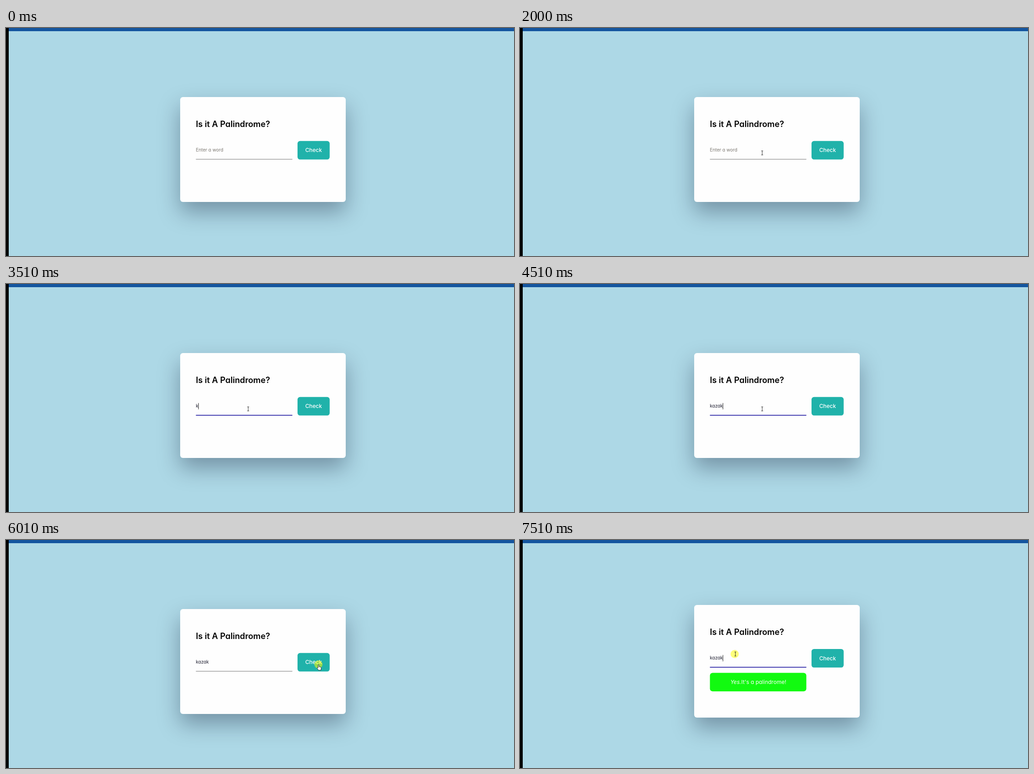
Recreate the animation shown at these times as an HTML page. Size 1117x502 px, loop 8000 ms.

```html
<!DOCTYPE html>
<html lang="en">
<head>
<meta charset="utf-8">
<title>Is it A Palindrome?</title>
<style>
html, body { margin: 0; width: 100%; height: 100%; overflow: hidden; background: #add8e6; }
#card {
  position: absolute; left: 382.6px; top: 152px; width: 364px; height: 230.5px;
  border-radius: 6px; background: #fefefe;
  box-shadow: 0 22px 48px rgba(5, 15, 40, .34);
}
#card.open { top: 143.2px; height: 248px; }
svg { position: absolute; left: 0; top: 0; }
text { font: 10px Poppins, Inter, sans-serif; font-feature-settings: "cv11"; white-space: pre; }
#title { font-size: 18.2px; font-weight: 600; }
#hint { fill: #7b7770; }
#word { fill: #1c1c2e; }
.light { font-size: 12px; fill: #fff; text-anchor: middle; }
.pointer { stroke: #222; stroke-width: .9; stroke-linejoin: round; fill: #fff; }
</style>
</head>
<body>
<div id="card"></div>
<svg width="1117" height="502" viewBox="0 0 1117 502">
  <rect width="6" height="502"/>
  <rect x="6" width="1111" height="7" fill="#14559f"/>
  <g id="form">
    <text id="title" x="417.5" y="218">Is it A Palindrome?</text>
    <text id="hint" x="417.6" y="272.2">Enter a word</text>
    <text id="word" x="417.6" y="272.2"></text>
    <rect id="caret" y="262" width="1" height="14" fill="#222"/>
    <rect id="line" x="417.6" y="288.2" width="212" height="1.6"/>
    <rect x="641" y="248.8" width="70.7" height="40.8" rx="5.5" fill="#20b2aa"/>
    <text class="light" x="676.3" y="273.4" font-weight="500" style="font-weight:500">Check</text>
    <g id="result">
      <rect x="417.6" y="301.2" width="212" height="40.8" rx="6" fill="#12fa10"/>
      <text class="light" x="524" y="326"><tspan font-style="italic" style="font-style:italic">Yes.</tspan>It's a palindrome!</text>
    </g>
  </g>
  <circle id="click" r="9" fill="#ff0" fill-opacity=".52"/>
  <path id="pointer" class="pointer"/>
</svg>
<script>
const LOOP = 8000;
const shapes = {
  arrow: 'M.5 .5V10L2.7 8L4.2 11.5L5.6 10.8L4.1 7.5H7Z',
  beam: 'M-2 -4.5H2M0 -4.5V4.5M-2 4.5H2',
  hand: 'M-1 7V1A1 1 0 0 1 1 1V4.6L4.6 5.5Q6 6 5.8 7.5L5 12.5H0L-3 8.4Q-3.6 7 -2.4 6.8Z'
};

// Each step changes only the listed properties; the rest carry over.
const steps = [
  { t: 0, shape: '', x: 0, y: 0, word: '', focus: false, caret: false, click: null, open: false },
  { t: 500, shape: 'arrow', x: 1034, y: 345 },
  { t: 1000, x: 675.7, y: 308 },
  { t: 1500, x: 581, y: 308 },
  { t: 2000, shape: 'beam', x: 532.5, y: 275 },
  { t: 2500, focus: true, caret: true },
  { t: 3000, caret: false },
  { t: 3510, word: 'k', caret: true },
  { t: 4010, word: 'kaz' },
  { t: 4510, word: 'kazak' },
  { t: 5010, caret: false },
  { t: 5510, caret: true },
  { t: 6010, shape: 'hand', x: 687.3, y: 274.3, focus: false, caret: false, click: [687, 274] },
  { t: 6510, click: null, open: true },
  { t: 7010, shape: 'beam', x: 476, y: 249 },
  { t: 7510, x: 473.5, y: 251, focus: true, caret: true, click: [472, 251] }
];

const $ = id => document.getElementById(id);
const set = (id, attrs) => {
  for (const name in attrs) $(id).setAttribute(name, attrs[name]);
};
const show = (id, on) => set(id, { visibility: on ? 'visible' : 'hidden' });

function draw(now) {
  const time = now % LOOP;
  const s = Object.assign({}, ...steps.filter(step => step.t <= time));

  $('card').className = s.open ? 'open' : '';
  set('form', { transform: `translate(0 ${s.open ? -8.8 : 0})` });
  show('result', s.open);

  $('word').textContent = s.word;
  show('hint', !s.word);
  const width = s.word ? $('word').getComputedTextLength() : 0;
  set('caret', { x: Math.round(417.6 + width) - .3 });
  show('caret', s.caret);
  set('line', { fill: s.focus ? '#1c14a0' : '#a6a6a6' });

  show('click', s.click);
  if (s.click) set('click', { cx: s.click[0], cy: s.click[1] });
  set('pointer', { d: shapes[s.shape] || '', transform: `translate(${s.x} ${s.y})` });
}

const start = performance.now();
function tick() {
  draw(performance.now() - start);
  requestAnimationFrame(tick);
}
tick();
</script>
</body>
</html>
```
